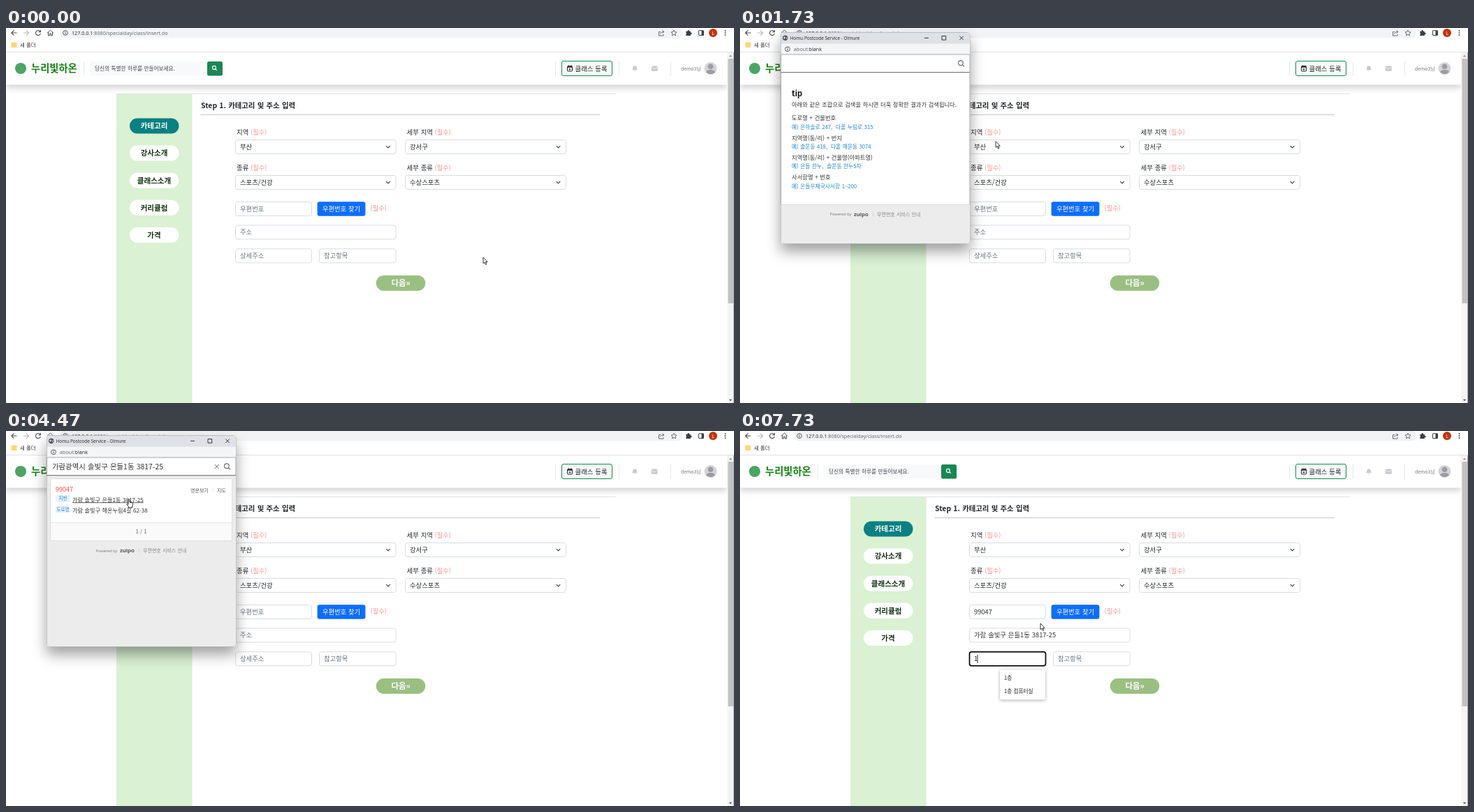
These frames come from a looping animation (1042 px wide and 538 px high, 8 s). An HTML page with a canvas:

```html
<!DOCTYPE html>
<html lang="ko">
<head>
<meta charset="utf-8">
<style>
html, body { margin: 0; width: 100%; height: 100%; overflow: hidden; background: #fff; }
canvas { display: block; }
</style>
</head>
<body>
<canvas id="stage" width="1042" height="538"></canvas>
<script>
const c = document.getElementById('stage').getContext('2d');
const KO = '"Noto Sans CJK KR", "Noto Sans CJK JP", sans-serif';
const EN = '"Open Sans", "Noto Sans", sans-serif';
const INK = '#212529', GREY = '#6c757d', BORDER = '#ced4da', ICON = '#4a4d51';
const QUERY = '가람광역시 솔빛구 은들1동 3817-25';
const REGION = '가람 솔빛구 ', ADDRESS = REGION + '은들1동 3817-25', POSTCODE = '99047';

const clamp = v => Math.max(0, Math.min(1, v));
const ramp = (t, a, b) => clamp((t - a) / (b - a));
const between = (t, a, b) => t >= a && t < b;
const mix = (a, b, k) => `rgb(${a.map((v, i) => Math.round(v + (b[i] - v) * k))})`;

function text(str, x, y, size, color = INK, { weight = 400, font = KO, align = 'left' } = {}) {
  c.font = `${weight} ${size}px ${font}`;
  c.wordSpacing = `${font === KO ? size * 0.09 : 0}px`;
  c.textAlign = align;
  c.fillStyle = color;
  c.fillText(str, x, y);
}
function box(x, y, w, h, r, fill, stroke, line = 1) {
  c.beginPath();
  c.roundRect(x, y, w, h, r);
  if (fill) { c.fillStyle = fill; c.fill(); }
  if (stroke) { c.strokeStyle = stroke; c.lineWidth = line; c.stroke(); }
}
const rect = (x, y, w, h, fill) => { c.fillStyle = fill; c.fillRect(x, y, w, h); };
const dot = (x, y, r, fill, stroke, line) => box(x - r, y - r, 2 * r, 2 * r, r, fill, stroke, line);
function path(d, x, y, fill, stroke, line = 1) {
  c.save();
  c.translate(x, y);
  const p = new Path2D(d);
  if (fill) { c.fillStyle = fill; c.fill(p); }
  if (stroke) { c.strokeStyle = stroke; c.lineWidth = line; c.lineJoin = 'round'; c.stroke(p); }
  c.restore();
}
function shadowed(blur, dy, alpha, draw) {
  c.save();
  c.shadowColor = `rgba(0,0,0,${alpha})`;
  c.shadowBlur = blur;
  c.shadowOffsetY = dy;
  draw();
  c.restore();
}
function infoIcon(x, y) {
  dot(x, y, 3.4, null, ICON, 0.9);
  rect(x - 0.5, y - 0.6, 1, 2.6, ICON);
  rect(x - 0.5, y - 2.1, 1, 1, ICON);
}
const magnifier = (x, y, color, s = 1) =>
  path(`M${2 * s} ${2 * s}L${4.4 * s} ${4.4 * s}M${2.8 * s} 0A${2.8 * s} ${2.8 * s} 0 1 1 ${-2.8 * s} 0A${2.8 * s} ${2.8 * s} 0 1 1 ${2.8 * s} 0`, x - 0.8, y - 0.8, null, color, 1.1);

function browserBar() {
  rect(0, 0, 1042, 34, '#fff');
  rect(0, 34, 1042, 1, '#dfe1e4');
  box(77, -1, 891, 15.5, 7.5, '#f1f3f4');
  path('M4 0H-3.5M0 -3.7L-3.7 0L0 3.7', 11.5, 7, null, ICON, 1.1);
  path('M-4 0H3.5M0 -3.7L3.7 0L0 3.7', 29, 7, null, '#b9bbbe', 1.1);
  path('M3 -1.8A3.5 3.5 0 1 0 3.4 1M3.4 -4V-1.2H.6', 46, 7, null, ICON, 1.1);
  path('M-4.3 0L0 -4L4.3 0M-3 -1V4H-1V1H1V4H3V-1', 63.5, 7, null, ICON, 1);
  infoIcon(85, 7);
  text('127.0.0.1', 94, 10, 7.2, '#202124', { font: EN });
  text(':8080/specialday/class/insert.do', 94 + c.measureText('127.0.0.1').width, 10, 7.2, '#5f6368', { font: EN });
  path('M-1 -2H-3.5V3.5H3V1.5M-1.5 1C-1 -1 1 -2 3.5 -2M1.5 -4L4 -2L1.5 0', 938, 7.5, null, ICON, 0.8);
  path('M0 -4L1.2 -1.3L4 -1L1.9 1L2.5 3.8L0 2.3L-2.5 3.8L-1.9 1L-4 -1L-1.2 -1.3Z', 956, 7, null, ICON, 0.8);
  path('M-3.7 -2.3H-1.5A1.3 1.3 0 1 1 1 -2.3H2.8V-.3A1.3 1.3 0 1 1 2.8 2V4H-3.7V2A1.3 1.3 0 0 0 -3.7 -.3Z', 977, 7, '#3c4043');
  box(991.5, 3.7, 7, 6.8, 0.5, null, '#3c4043', 1);
  rect(995.5, 4, 3, 6.5, '#3c4043');
  dot(1012, 7, 6, '#bf360c');
  text('L', 1012, 9.6, 7, '#fff', { font: EN, align: 'center' });
  for (const y of [4, 7, 10]) dot(1029.5, y, 0.9, '#3c4043');
  box(7.5, 20.5, 8, 7.5, 1, '#fbd774');
  text('새 폴더', 20, 27, 7.3, '#333');
}

function siteHeader() {
  shadowed(8.7, 4.3, 0.18, () => rect(0, 35, 1032, 46.5, '#fff'));
  dot(21, 58, 8, '#4aa564');
  text('누리빛하온', 36, 63, 14.3, '#138313', { weight: 700 });
  for (const x of [111, 786, 877, 951]) rect(x, 48, 1, 21, '#e6e8ea');
  rect(120, 48, 168, 20.5, '#f8f9fa');
  text('당신의 특별한 하루를 만들어보세요.', 127, 60.8, 7.65, '#41464b');
  box(288, 48, 22, 20.5, 2.5, '#198754');
  magnifier(298.7, 57.7, '#fff', 0.9);
  box(795.5, 47.5, 72, 21, 2.5, '#f6fbf7', '#198754', 1);
  box(803.5, 55, 7, 7, 1, null, INK, 1);
  rect(803.5, 54.5, 7, 2.2, INK);
  rect(805, 53.3, 1, 2, INK);
  rect(808.5, 53.3, 1, 2, INK);
  path('M-1.5 0H1.5M0 -1.5V1.5', 807, 59.3, null, INK, 0.9);
  text('클래스 등록', 814.5, 61.5, 9.4);
  path('M-4 2.3C-2.6 1 -2.8 -1 -2.6 -2C-2 -4 2 -4 2.6 -2C2.8 -1 2.6 1 4 2.3ZM-1 3H1L0 4.2Z', 900, 58, '#c8c9cf');
  box(923.7, 54.5, 9, 7.3, 1, '#c8c9cf');
  path('M-4.5 -2.3L0 1L4.5 -2.3', 928.2, 58, null, '#fff', 0.8);
  text('demo3님', 966, 61, 6.8, '#777');
  dot(1008.5, 58, 9, '#d4d4d6');
  c.save();
  dot(1008.5, 58, 8.3);
  c.clip();
  dot(1008.5, 55.2, 3.8, '#9c9da2');
  box(1001.5, 60, 14, 12, 5.5, '#9c9da2');
  c.restore();
}

function scrollbar() {
  rect(1032.5, 35, 9.5, 503, '#f4f4f4');
  rect(1033.5, 44, 7.5, 351, '#c1c1c1');
  rect(1041, 35, 1, 503, '#a8a8a8');
  path('M-2.2 1.2L0 -1.2L2.2 1.2Z', 1037, 40, '#8a8a8a');
  path('M-2.2 -1.2L0 1.2L2.2 -1.2Z', 1037, 534, '#505050');
}

function field(x, y, w, value, { color = INK, select = false, focus = false } = {}) {
  if (focus) box(x + 0.5, y + 0.5, w - 1, 20, 3, '#fff', '#101010', 1.8);
  else box(x + 0.5, y + 0.5, w - 1, 20, 3, '#fff', BORDER, 0.8);
  text(value, x + 7, y + 13.6, 9.35, color);
  if (select) path('M-2.8 -1.4L0 1.4L2.8 -1.4', x + w - 11.5, y + 10.5, null, '#343a40', 1.1);
}
function label(name, x, y, gap) {
  text(name, x, y, 9.4, INK, { weight: 500 });
  text('(필수)', x + gap, y, 9.3, '#f59393');
}

function form(t, hover) {
  rect(158, 94, 715, 1, '#e1e3e5');
  rect(158, 95, 108.5, 443, '#daf1d3');
  ['카테고리', '강사소개', '클래스소개', '커리큘럼', '가격'].forEach((name, i) => {
    const y = 129.5 + 39.1 * i;
    box(177, y, 70.5, 22, 11, i ? '#fff' : '#0a8080');
    text(name, 212, y + 14.8, 10.5, i ? '#123012' : '#fff', { weight: 700, align: 'center' });
  });
  text('Step 1. 카테고리 및 주소 입력', 279, 115, 10.4, INK, { weight: 700 });
  for (let x = 279; x < 851; x += 2) rect(x, 124, 1, 1, '#8d8d8d');

  label('지역', 330, 152.6, 20);
  label('세부 지역', 573.5, 152.6, 40);
  field(328, 160, 230.5, '부산', { select: true });
  field(571, 160, 231, '강서구', { select: true });
  label('종류', 330, 203.8, 20);
  label('세부 종류', 573.5, 203.8, 40);
  field(328, 211, 230.5, '스포츠/건강', { select: true });
  field(571, 211, 231, '수상스포츠', { select: true });

  const filled = t >= 4530, typed = t >= 7600;
  const focus = between(t, 4600, 5330) || t >= 6830;
  const caret = between(t, 4600, 5130) || between(t, 6830, 7330) || typed;
  const hint = { color: GREY };
  field(328, 249, 110, filled ? POSTCODE : '우편번호', filled ? { color: '#333' } : hint);
  box(445.6, 249.3, 68.8, 20.5, 3, hover === 'find' ? '#0b5ed7' : '#0d6efd');
  text('우편번호 찾기', 480, 262.7, 9.3, '#fff', { align: 'center' });
  text('(필수)', 521.5, 262.3, 9.3, '#f59393');
  field(328, 282.5, 230.5, filled ? ADDRESS : '주소', filled ? { color: '#333' } : hint);
  field(328, 316.3, 110, typed ? '1' : '상세주소', { color: typed ? INK : GREY, focus });
  if (caret) rect(typed ? 339.5 : 335, 321, 0.9, 12, '#111');
  field(448, 316.3, 110.5, '참고항목', hint);

  const press = ramp(t, 5000, 5270) * (1 - ramp(t, 6780, 7070));
  shadowed(3.5 * press, 1.2 * press, 0.75 * press, () =>
    box(529.7, 355, 70.6, 22, 11, mix([155, 191, 130], [106, 168, 79], press)));
  text('다음»', 565, 370.2, 11.5, mix([255, 255, 255], [215, 222, 211], press), { weight: 700, align: 'center' });

  if (t >= 7700) {
    shadowed(4, 1, 0.35, () => box(372, 342.5, 65, 43, 2, '#fff'));
    text('1층', 378, 357, 7.6, '#222');
    text('1층 컴퓨터실', 378, 376.3, 7.6, '#222');
  }
}

function searchTips() {
  text('tip', 74, 98, 11.2, '#111', { weight: 700 });
  text('아래와 같은 조합으로 검색을 하시면 더욱 정확한 결과가 검색됩니다.', 74, 112.8, 8.28, '#333');
  [['도로명 + 건물번호', '은하솔로 247,  다올 누림로 315'],
   ['지역명(동/리) + 번지', '솔운동 418,  다올 해윤동 3074'],
   ['지역명(동/리) + 건물명(아파트명)', '은들 한누,  솔운동 한누5차'],
   ['사서함명 + 번호', '은들우체국사서함 1~200']].forEach(([rule, sample], i) => {
    text(rule, 74, 132.3 + 28.2 * i, 8.3, '#333');
    text('예) ' + sample, 74, 145 + 28.2 * i, 7.75, '#2687c8');
  });
}

function searchResults(linked) {
  box(63.5, 68.5, 260, 89, 0, '#fff', '#dedede', 1);
  rect(64, 131, 259, 26, '#fafafa');
  rect(64, 131, 259, 1, '#e4e4e4');
  text(POSTCODE, 71, 87, 9, '#fa4b45');
  text('영문보기', 264, 88, 7, '#555');
  rect(296, 82, 0.7, 5, '#ddd');
  text('지도', 302, 88, 7, '#555');
  [['지번', ADDRESS, 97], ['도로명', REGION + '해온누림4길 62-38', 112.5]].forEach(([tag, line, y]) => {
    box(71.5, y - 4.5, 20, 9, 1, '#e9f5fc', '#d3e9f6', 0.6);
    text(tag, 81.5, y + 2.4, 6.5, '#1a80c0', { align: 'center' });
    text(line, 95, y + 4.5, 8.15, '#333');
    if (linked && tag === '지번') rect(95, y + 5.4, c.measureText(line).width, 0.8, '#333');
  });
  text('1 / 1', 193.5, 147.3, 7.4, '#555', { align: 'center' });
}

function popup(t, linked) {
  if (!between(t, 1250, 4680)) return;
  const show = Math.min(ramp(t, 1220, 1320), 1 - ramp(t, 4530, 4680));
  const loaded = t >= 1600, results = t >= 3430, query = t >= 2730;
  c.save();
  c.globalAlpha = show;
  c.translate(194, 158);
  c.scale(0.92 + 0.08 * show, 0.92 + 0.08 * show);
  c.translate(-194, -158);
  shadowed(20, 11, 0.38, () => box(58, 6, 271.5, 303.5, 4, '#fff'));
  box(58.5, 6.5, 270.5, 302.5, 4, '#fff', '#9b9da0', 1);
  c.clip();
  rect(58, 6, 272, 17, '#dee1e6');
  rect(58, 22.5, 272, 15.5, '#f4f5f6');
  rect(58, 37.5, 272, 1, '#a5a7aa');
  if (loaded) {
    dot(64.7, 14.3, 3.7, '#50555b');
    path('M-2.5 -1L-.5 -2.3L0 0L-1.5 1.8ZM1 -.5L2.8 -1L2 2Z', 64.7, 14.3, '#dee1e6');
  } else path('M2.6 -2.4A3.5 3.5 0 1 1 -1.5 -3.2', 64.7, 14.3, null, '#2f6fdb', 1.2);
  text('Homu Postcode Service - Olmure', 71.5, 17, 6.5, '#222', { font: EN });
  path('M-3 0H3M22 -2.8H27.6V2.8H22ZM47.3 -2.8L52.9 2.8M52.9 -2.8L47.3 2.8', 267, 14.3, null, '#222', 0.9);
  infoIcon(68, 30.3);
  text('about:', 77, 33, 7.2, '#5f6368', { font: EN });
  text('blank', 77 + c.measureText('about:').width, 33, 7.2, '#202124', { font: EN });

  if (loaded) {
    if (results) {
      rect(58, 64, 272, 246, '#ececec');
      searchResults(linked);
    } else {
      searchTips();
      rect(58, 253, 272, 57, '#ececec');
      rect(58, 253, 272, 1, '#dadada');
    }
    rect(58, 63, 272, 1.2, '#7d7d7d');
    if (query) {
      text(QUERY, 66, 54.6, 10.4, '#333');
      if (t < 3200) rect(66.5 + c.measureText(QUERY).width, 44, 1, 13, '#222');
    } else if (between(t, 1770, 2270)) rect(66, 44, 1, 13, '#222');
    if (t >= 2800) path('M-3 -3L3 3M3 -3L-3 3', 301.7, 51, null, '#666', 1);
    magnifier(316.7, 51, '#666', 1.2);
    const y = results ? 174 : 269.5;
    text('Powered by', 128.5, y - 0.3, 5.7, '#777', { font: EN });
    text('zulpo', 163, y, 7.9, '#333', { font: EN, weight: 600 });
    rect(190, y - 5.5, 0.7, 6, '#ccc');
    text('우편번호 서비스 안내', 196, y, 7, '#888');
  }
  c.restore();
}

function dialog(t, hover) {
  const show = ramp(t, 5300, 5440) * (1 - ramp(t, 6700, 6830));
  if (!show) return;
  c.save();
  c.globalAlpha = show;
  shadowed(5, 1.2, 0.5, () => box(399, 15, 243, 71, 3, '#fff'));
  box(399, 15, 243, 71, 3, '#fff', '#b4b6b9', 0.8);
  text('127.0.0.1:8080 내용:', 407.5, 33, 7.9, '#202124');
  text('상세주소를 입력하세요.', 407.5, 48, 7.65, '#202124');
  box(598.5, 59.7, 35, 17.3, 2.5, '#fff', '#1a66cc', 1.2);
  box(600, 61, 32, 14.7, 1.5, hover === 'ok' ? '#2f80ea' : '#1a73e8');
  text('확인', 616, 70.8, 7, '#fff', { align: 'center' });
  c.restore();
}

// Each leg: start time, end time, destination.
const START = [683, 329];
const LEGS = [[530, 1130, 490.5, 263], [1400, 2070, 237, 58.5], [2760, 3200, 313.5, 55], [3700, 4130, 176, 98],
  [4560, 5070, 559, 364], [5780, 6270, 599, 85.5], [6330, 6530, 615, 68], [6720, 7070, 430, 276]];
function pointerAt(t) {
  let [x, y] = START;
  for (const [a, b, tx, ty] of LEGS) {
    const k = ramp(t, a, b), e = k * k * (3 - 2 * k);
    x += (tx - x) * e;
    y += (ty - y) * e;
  }
  return [x, y];
}

function hoverAt(t, x, y) {
  const over = (x0, y0, x1, y1) => x >= x0 && x <= x1 && y >= y0 && y <= y1;
  if (between(t, 1270, 4600) && over(58, 6, 330, 310)) {
    if (over(60, 40, 296, 64)) return 'input';
    if (over(296, 40, 322, 64)) return 'search';
    return t > 3530 && over(95, 93, 197, 103) ? 'link' : '';
  }
  if (between(t, 5800, 6730)) return over(598, 59, 634, 77) ? 'ok' : '';
  if (over(445, 249, 515, 270)) return 'find';
  if (over(530, 355, 600, 377)) return 'next';
  return over(328, 249, 438, 270) || over(328, 283, 558, 303) || over(328, 316, 558, 337) ? 'input' : '';
}

function pointer(x, y, hover) {
  if (hover === 'input')
    path('M-2 -5H2M0 -5V5M-2 5H2', x, y, null, '#111', 0.9);
  else if (['find', 'next', 'search', 'link'].includes(hover))
    path('M-1 .8C-1 -.3 1 -.3 1 .8V4.2L4.6 5C5.6 5.3 5.7 6 5.5 7.2L4.8 10V12H-.6V10.6L-3 7.5C-3.5 6.3 -2.3 6 -1 7.4Z', x, y, '#fff', '#111', 0.9);
  else
    path('M0 0V8.8L2 7.1L3.4 10.4L4.9 9.8L3.5 6.6H6.2Z', x, y, '#fff', '#222', 0.9);
}

function render(now) {
  const t = now % 8000;
  const [x, y] = pointerAt(t);
  const hover = hoverAt(t, x, y);
  rect(0, 0, 1042, 538, '#fff');
  form(t, hover);
  siteHeader();
  scrollbar();
  browserBar();
  popup(t, hover === 'link');
  dialog(t, hover);
  pointer(x, y, hover);
  requestAnimationFrame(render);
}
requestAnimationFrame(render);
</script>
</body>
</html>
```
